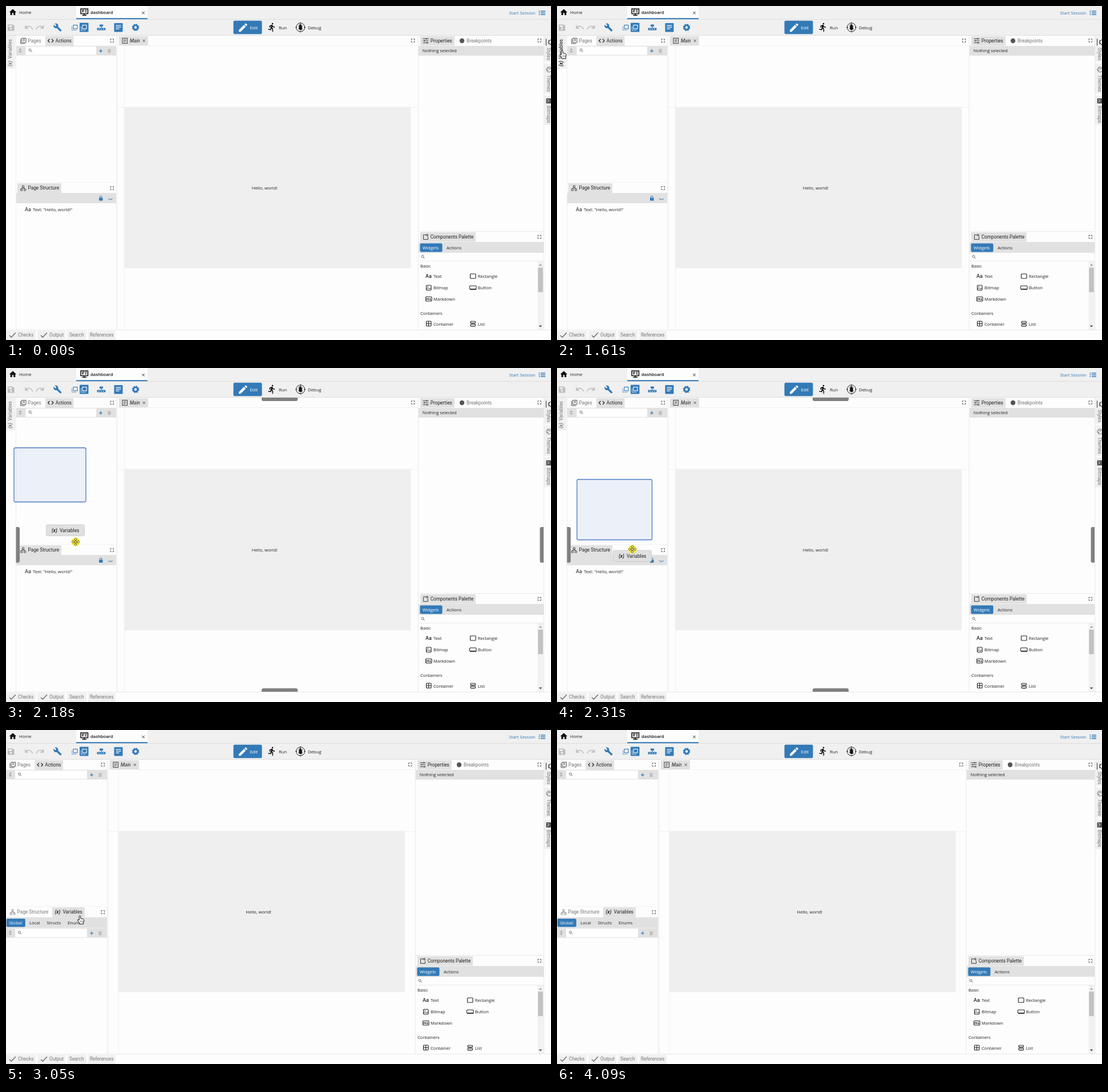
An HTML page that plays this animation: 955x586 px, repeating every 4570 ms.

```html
<!DOCTYPE html>
<html lang="en">
<head>
<meta charset="utf-8">
<title>Docking a panel</title>
<style>
html, body { margin: 0; width: 100%; height: 100%; overflow: hidden; background: #fdfdfd; }
svg { display: block; width: 955px; height: 586px; }
text { white-space: pre; }
.ui { font: 7.65px "Open Sans", "Noto Sans", sans-serif; }
.tab { font: 8.3px Roboto, Arial, sans-serif; }
</style>
</head>
<body>
<svg id="stage" viewBox="0 0 955 586"></svg>
<script>
const LOOP = 4570;
const BLUE = '#337ab7', BAR = '#e1e1e1', PALE = '#f0f0f0', DARK = '#222', GREY = '#777';

// Drawing helpers
const rect = (x, y, w, h, fill, extra = '') =>
  `<rect x="${x}" y="${y}" width="${w}" height="${h}" fill="${fill}" ${extra}/>`;
const line = (d, color, width = 1, extra = '') =>
  `<path d="${d}" fill="none" stroke="${color}" stroke-width="${width}" ${extra}/>`;
const shape = (d, fill, extra = '') => `<path d="${d}" fill="${fill}" ${extra}/>`;
const dot = (x, y, r, fill, extra = '') => `<circle cx="${x}" cy="${y}" r="${r}" fill="${fill}" ${extra}/>`;
const at = (x, y, body, more = '') => `<g transform="translate(${x} ${y}) ${more}">${body}</g>`;
const label = (kind, x, y, s, fill = DARK, extra = '') =>
  `<text class="${kind}" x="${x}" y="${y + 2.8}" fill="${fill}" ${extra}>${s}</text>`;
const ui = (...a) => label('ui', ...a);
const tab = (...a) => label('tab', ...a);

// Icons
const expand = (x, y) => at(x - 2.7, y - 2.7,
  line('M0 2V0H2M3.5 0H5.5V2M5.5 3.5V5.5H3.5M2 5.5H0V3.5', '#444', .9));
const search = (x, y) => dot(x - .5, y - .6, 2, 'none', 'stroke="#555" stroke-width=".8"') +
  line(`M${x + 1} ${y + 1}l2 2`, '#555', .9);
const plus = (x, y) => line(`M${x - 3} ${y}h6M${x} ${y - 3}v6`, BLUE, 1.2);
const trash = (x, y) => shape(`M${x - 2.5} ${y - 2}h5v5.5h-5zM${x - 3} ${y - 3.4}h6v1h-6z`, '#bdbdbd');
const sorter = (x, y) => shape(`M${x - 2.6} ${y - .7}l2.6 -3.6 2.6 3.6zM${x - 2.6} ${y + .7}l2.6 3.6 2.6 -3.6z`, '#aaa');
const check = (x, y) => line(`M${x} ${y + .5}l3.3 3.3 7.5 -8`, '#666', 1.3);
const pages = (x, y) => line(`M${x + 2.5} ${y - 4.5}h7.5v7.5h-7.5zM${x + .5} ${y - 3}v8h8M${x + 4.5} ${y - 2.5}h3.5M${x + 4.5} ${y - .5}h3.5`, '#555', 1);
const code = (x, y) => line(`M${x + 3.5} ${y - 3}l-3 3 3 3M${x + 7} ${y - 3}l3 3 -3 3`, DARK, 1.2);
const tree = (x, y, c) => line(`M${x + 3.5} ${y - 4.5}h3v3h-3zM${x + .5} ${y + 1.5}h3v3h-3zM${x + 6.5} ${y + 1.5}h3v3h-3zM${x + 5} ${y - 1.5}v1.5M${x + 2} ${y + 1.5}v-1.5h6v1.5`, c, .9);
const varIcon = (x, y, fill = DARK) => tab(x, y, '(x)', fill, 'style="font-weight:700;font-style:italic"');
const aa = (x, y, fill = DARK) => tab(x, y, 'Aa', fill, 'style="font-size:9px;font-weight:500"');

const searchBar = (x, y, left, right) =>
  rect(left, y - 8.5, right - left, 17, BAR) + sorter(left + 7.5, y) +
  rect(x, y - 7.2, right - 35 - x, 14.7, '#fff') + search(x + 8, y - .5) +
  plus(right - 27, y + .5) + trash(right - 12, y + .5);

function header() {
  const undo = line('M0 -3v5h5M.5 1.5C3 -2.5 10 -3 12.5 4', '#bbb', 1.5);
  const wrench = 'M22.7 19l-9.1-9.1c.9-2.3.4-5-1.5-6.9-2-2-5-2.4-7.4-1.3L9 6 6 9 1.6 4.7C.4 7.1.9 10.1 2.9 12.1c1.9 1.9 4.6 2.4 6.9 1.5l9.1 9.1c.4.4 1 .4 1.4 0l2.3-2.3c.5-.4.5-1.1.1-1.4z';
  const pencil = 'M3 17.25V21h3.75L17.81 9.94l-3.75-3.75zM20.71 7.04a1 1 0 0 0 0-1.41l-2.34-2.34a1 1 0 0 0-1.41 0l-1.83 1.83 3.75 3.75z';
  const runner = 'M13.49 5.48c1.1 0 2-.9 2-2s-.9-2-2-2-2 .9-2 2 .9 2 2 2zm-3.6 13.9l1-4.4 2.1 2v6h2v-7.5l-2.1-2 .6-3c1.3 1.5 3.3 2.5 5.5 2.5v-2c-1.9 0-3.5-1-4.3-2.4l-1-1.6c-.4-.6-1-1-1.7-1-.3 0-.5.1-.8.1l-5.2 2.2v4.7h2v-3.4l1.8-.7-1.6 8.1-4.9-1-.4 2 7 1.4z';
  const dashed = (x, y, c) => rect(x, y, 7, 6.5, 'none', `stroke="${c}" stroke-width="1.1"`) +
    line(`M${x - 2.5} ${y + 2.5}v6.5h7.5`, c, 1.1, 'stroke-dasharray="1.5 1"');
  return rect(0, 0, 955, 51, PALE) + rect(123, 0, 125, 23, '#fdfdfd') +
    line('M0 23.5H955M0 51.5H955', '#dcdcdc') + rect(123, 21.2, 125, 2, BLUE) +
    at(4.5, 3.5, shape('M10 20v-6h4v6h5v-8h3L12 3 2 12h3v8z', '#111'), 'scale(.62)') + ui(23, 11, 'Home') +
    rect(131, 5, 12.5, 8.5, 'none', 'stroke="#111" stroke-width="1.5"') +
    line('M133 7.5h4M133 10h3M138.5 7.5h3M138 10.3h3.5', '#111', 1.3) +
    line('M137.2 13.5v2.5M133.5 16.2h7.5', '#111', 1.5) +
    ui(148, 11, 'dashboard', '#111', 'style="font-weight:600"') +
    line('M238.3 9.8l4.6 4.6m0 -4.6l-4.6 4.6', '#333', 1) +
    ui(881.5, 12, 'Start Session', BLUE) +
    line('M937 9h8M937 12h8M937 15h8', BLUE, 1.3) + line('M933.5 9h2M933.5 12h2M933.5 15h2', BLUE, 1.3) +
    shape('M3 32.5h9l2.5 2.5v8.5h-11.5z', '#bcbcbc') + rect(4.5, 34, 6, 2.8, PALE) + dot(8.7, 40, 1.8, PALE) +
    at(34, 37, undo) + at(65.5, 37, undo, 'scale(-1 1)') +
    at(82.5, 29.8, shape(wrench, BLUE), 'scale(.65)') +
    dashed(118, 33.5, BLUE) + rect(129, 29.5, 15.5, 16, BLUE, 'rx="1"') + dashed(134, 33.5, '#fff') +
    rect(164, 32.5, 6, 3.5, BLUE) + rect(166.5, 35, 1.2, 4, BLUE) + rect(159.5, 38.5, 15, 4, BLUE, 'rx="1"') +
    line('M162 40.5h2M166 40.5h2M170 40.5h2', PALE, 1) +
    rect(189.5, 30, 15, 15.5, BLUE, 'rx="1"') + line('M192.5 34.2h9M192.5 37.2h9M192.5 40.2h6', '#fff', 1.3) +
    dot(227, 37.6, 3.8, 'none', `stroke="${BLUE}" stroke-width="3"`) +
    dot(227, 37.6, 5.4, 'none', `stroke="${BLUE}" stroke-width="1.8" stroke-dasharray="2.4 1.84"`) +
    rect(398.5, 25.8, 50, 23.4, BLUE, 'rx="2.5"') +
    at(405.5, 28, shape(pencil, '#fff'), 'scale(.82)') + ui(427.5, 38, 'Edit', '#fff') +
    at(457.3, 28.6, shape(runner, '#111'), 'scale(.72)') + ui(478, 38, 'Run') +
    dot(516, 37.5, 7.6, 'none', 'stroke="#222" stroke-width="1"') +
    line('M516 28.5v3M516 43.5v3M507 37.5h3M522 37.5h3M512 34.5l8 6M520 34.5l-8 6M513.5 32.5l5 10', '#222', .9) +
    `<ellipse cx="516" cy="38.3" rx="2.8" ry="4" fill="#111"/>` + dot(516, 34, 1.9, '#111') + ui(529, 38, 'Debug');
}

function borders() {
  const side = (y, h, textY, s) => rect(943, y, 12, h, PALE) +
    at(948.2, textY, `<text class="tab" fill="${GREY}">${s}</text>`, 'rotate(90)');
  const foot = (x, w, textX, s) => rect(x, 570, w, 16, PALE) + tab(textX, 577.5, s, GREY);
  return line('M942.5 52V568M0 568.5H955', '#e8e8e8') +
    side(53, 45, 73, 'Styles') + side(101, 53, 121, 'Themes') + side(157, 52, 175, 'Bitmaps') +
    line('M946.5 57.5v12M950.5 63l4 -4M950 63.5l5 5M951 60v7', '#555', 1.3) +
    dot(951.5, 111.5, 4.5, 'none', 'stroke="#666" stroke-width="1"') + dot(950, 109.5, 1, '#666') + dot(953, 110, 1, '#666') + dot(949.5, 113, 1, '#666') +
    rect(946.5, 162, 9, 9, '#555', 'rx="1"') + line('M948.5 164.5h2M949 169l3 -4', '#eee', 1) +
    foot(0, 52, 21, 'Checks') + foot(55, 49, 76, 'Output') + foot(107, 34, 111, 'Search') + foot(144, 48, 147, 'References') +
    check(6, 577.5) + check(61, 577.5);
}

function leftPanels(docked) {
  const x = docked ? 0 : 18.5, right = docked ? 177 : 193, left = docked ? 0 : 17.5;
  let s = rect(x + 50.5, 53, 49.5, 17, BAR) + pages(x + 6.5, 61) + tab(x + 20, 61, 'Pages', GREY) +
    code(x + 54.5, 61) + tab(x + 68.3, 61, 'Actions') + expand(right - 7.3, 60.8) +
    searchBar(x + 16, 78.3, left, right) + line(`M${right + .5} 52V568M${right + 2} 52V568`, '#efefef') +
    line(`M${left} 309.5H${right}`, '#f2f2f2') + expand(right - 7.3, 319.5);
  if (docked) {
    s += rect(81, 311, 57, 17.5, BAR) + tree(6.5, 319.5, '#888') + tab(19.5, 319.5, 'Page Structure', GREY) +
      varIcon(85.5, 319.5) + tab(99.5, 319.5, 'Variables') +
      rect(0, 328.5, 177, 18.5, BAR) + rect(.8, 331, 33, 14.5, BLUE, 'rx="2"') + ui(5.3, 338.3, 'Global', '#fff') +
      ui(41, 338.3, 'Local') + ui(71.5, 338.3, 'Structs') + ui(108, 338.3, 'Enums') + searchBar(16, 356, 0, 177);
  } else {
    s += rect(20, 311, 77, 17, BAR) + tree(25, 319.5, '#444') + tab(38.5, 319.5, 'Page Structure') +
      rect(17.5, 328, 175.5, 18, BAR) + rect(163, 336.5, 6.5, 5, BLUE, 'rx=".6"') +
      line('M164.4 337v-1.6a1.85 1.85 0 0 1 3.7 0V337', BLUE, 1.1) +
      line('M179 337.5q4 3.5 8 0M181 339l-.7 1.2M183 339.5v1.3M185 339l.7 1.2', BLUE, .8) +
      aa(33, 356.7, '#444') + ui(47, 357, 'Text: "Hello, world!"') +
      line('M17.5 52V568', '#efefef') + rect(0, 52, 16.5, 58, PALE) +
      `<g id="sideTab" fill="${GREY}">` +
      at(10.2, 92.5, `<text class="tab">Variables</text>`, 'rotate(-90)') +
      at(10.2, 106, `<text class="tab" style="font-weight:700;font-style:italic">(x)</text>`, 'rotate(-90)') + '</g>';
  }
  return s;
}

function centerPanel(docked) {
  const x = docked ? 179 : 195, page = docked ? 196.7 : 207.2, right = docked ? 717 : 722;
  return rect(x + 3, 53, 51, 16, BAR) +
    rect(x + 9, 56.5, 8.5, 9, 'none', 'stroke="#444"') + line(`M${x + 11} 59h4.5M${x + 11} 61h4.5M${x + 11} 63h3`, '#444', .8) +
    tab(x + 22, 61, 'Main', DARK, 'style="font-style:italic"') +
    line(`M${x + 44.5} 58.8l4.4 4.4m0 -4.4l-4.4 4.4`, '#444', .9) + expand(right - 8.8, 60.5) +
    line(`M${x} 69.5H${right}M${page + .3} 70V568M${x} 177.7H${right}`, '#f0f0f0') +
    rect(page, 178, 502, 282, '#efefef') + ui(page + 223.6, 319, 'Hello, world!') +
    line(`M${right + .3} 52V568`, '#e9e9e9');
}

function rightPanels(docked) {
  const dx = docked ? -5 : 0, left = 723 + dx, width = 942 - left;
  const box = (x, y, w, h) => rect(x, y, w, h, 'none', 'rx="1" stroke="#222" stroke-width="1.1"');
  const fixed = rect(left, 70, width, 17, BAR) + expand(934.7, 60.5) + expand(934.7, 405) +
    rect(left, 414, width, 19, BAR) + line(`M${left} 395.5H942M${left} 447.5H942`, '#eaeaea') +
    rect(931.5, 448, 10, 120, '#f1f1f1') + rect(932.3, 459, 8.5, 43, '#c1c1c1') +
    shape('M933.8 455.5l2.7 -3 2.7 3z', '#999') + shape('M933.8 560.5l2.7 3 2.7 -3z', '#444');
  const moving = rect(726, 53, 60, 16.5, BAR) +
    line('M730.5 57.5h10M730.5 61h10M730.5 64.5h10M737 56v3M733.5 59.5v3M738 63v3', '#444', 1) +
    tab(743.7, 61, 'Properties') + dot(799, 61, 4.2, '#555') + tab(807, 61, 'Breakpoints', GREY) +
    ui(729.8, 78.5, 'Nothing selected') +
    rect(726, 397, 97, 16.5, BAR) + line('M737 401.5h-5.5v8h8v-5M738 399.5v5M735.5 402h5', '#444', 1) +
    tab(743.7, 405.3, 'Components Palette') +
    rect(725.5, 416.5, 39, 15, BLUE, 'rx="2"') + ui(730, 424, 'Widgets', '#fff') + ui(772, 424, 'Actions') +
    search(730.5, 440) + ui(726, 456, 'Basic') + ui(726, 539.5, 'Containers') +
    aa(735, 474) + ui(749, 474.3, 'Text') + box(813.5, 470, 9.5, 8) + ui(826.7, 474.3, 'Rectangle') +
    box(736.5, 490, 8.5, 8.5) + line('M737 496.5l2.2 -2 2 2 2 -1.5 1.5 1.5', DARK, 1) + dot(739.2, 492.6, .8, DARK) + ui(749, 494.3, 'Bitmap') +
    box(812.5, 491, 11.5, 5.5) + line('M813 497h11.2', DARK, 1.6) + ui(826.7, 494.3, 'Button') +
    box(735.5, 510.3, 10.5, 7.4) + line('M737.4 516v-3.4l1.6 1.8 1.6 -1.8v3.4M743.4 512.4v3M742 514.6l1.4 1.5 1.4 -1.5', DARK, 1) + ui(749, 514.3, 'Markdown') +
    box(736.5, 553, 8.5, 8.5) + line('M740.7 553v8.5M736.5 557.2h8.5', DARK, 1.1) + ui(749, 558.3, 'Container') +
    box(814, 553.2, 8.5, 3.2) + box(814, 558.4, 8.5, 3.2) + ui(826.7, 558.3, 'List');
  return fixed + at(dx, 0, moving);
}

const layout = docked => leftPanels(docked) + centerPanel(docked) + rightPanels(docked);

const handles = shape('M448 52h63v3q0 3 -3 3h-57q-3 0 -3 -3zM448 568v-3q0 -3 3 -3h57q3 0 3 3v3z' +
  'M17.5 279h3.5q3 0 3 3v56.500q0 3 -3 3h-3.5zM942 279h-3.500q-3 0 -3 3v56.500q0 3 3 3h3.500z', '#808080');
const cursors = {
  arrow: shape('M.5 .5V15.500L4 12.300 6.500 18 8.700 17 6.300 11.500H11.200Z', '#fff', 'stroke="#111" stroke-width=".9"'),
  hand: shape('M-1.300 1Q0 -.8 1.300 1V5L5.800 6Q7.300 6.500 7.100 8.500L6.300 12V14.800H-1V13L-3.800 8.700Q-4.200 6.700 -2.600 7L-1.300 8.300Z', '#fff', 'stroke="#111" stroke-width="1"') +
    line('M3 9v3M1 9v3M5 9v3', '#111', .6),
  move: dot(0, 0, 7.5, '#fdf03c') +
    [0, 90, 180, 270].map(a => shape('M0 -7l2.500 2.700h-1.500v2.300h-2v-2.300h-1.500z', '#fffbc0',
      `stroke="#554d00" stroke-width=".8" transform="rotate(${a})"`)).join('') +
    rect(-1.3, -1.3, 2.6, 2.6, '#fffbc0', 'stroke="#554d00" stroke-width=".7"')
};

const stage = document.getElementById('stage');
stage.innerHTML = rect(0, 0, 955, 586, '#fdfdfd') + header() + borders() +
  `<g id="before">${layout(false)}</g><g id="after">${layout(true)}</g>` +
  `<g id="drag">${handles}` +
  `<rect id="outline" rx="2.5" fill="#3f6fd0" fill-opacity=".09" stroke="#4c7cc4" stroke-width="1.3"/>` +
  `<g id="chip">${rect(-33.5, 2, 67, 19.5, '#e0e0e0', 'rx="2.5" stroke="#c8c8c8" stroke-width=".8"')}` +
  `${varIcon(-24, 11.8)}${tab(-10, 11.8, 'Variables')}</g></g>` +
  Object.entries(cursors).map(([name, body]) => `<g id="${name}">${body}</g>`).join('');

const el = id => document.getElementById(id);
const show = (id, on) => el(id).setAttribute('display', on ? 'inline' : 'none');
const move = (id, [x, y]) => el(id).setAttribute('transform', `translate(${x} ${y})`);
const mix = (a, b, p) => a.map((v, i) => v + (b[i] - v) * p);
const ease = p => p * p * (3 - 2 * p);

const step = (t, from, to, count) =>
  Math.max(0, Math.min(count - 1, Math.floor((t - from) / (to - from) * (count - 1) + .1)));

// Linear interpolation through [step, values] keys.
function track(keys, k) {
  const i = Math.max(1, keys.findIndex(([at]) => at >= k));
  const [a, from] = keys[i - 1], [b, to] = keys[i];
  return mix(from, to, (k - a) / (b - a));
}
const dragPath = [[0, [10, 83]], [2, [55, 191]], [3, [86, 241]], [5, [122, 305]], [7, [132, 318]], [11, [132, 325]]];
const dropBox = [[0, [.5, 53, 17, 110]], [3, [3.5, 53.5, 34.5, 109.5]], [5, [14, 140, 140, 235]],
  [7, [35, 195.5, 166.5, 301.500]], [9, [80, 277, 118, 322]], [11, [97, 311, 100, 329]]];

const dragStep = t => t < 2380 ? step(t, 1810, 2310, 8) : 8 + step(t, 2380, 2590, 4);

function cursorAt(t) {
  if (t < 590) return null;
  if (t < 1000) return ['arrow', mix([864, 548], [3, 118], ease(step(t, 590, 1000, 7) / 5))];
  if (t < 1270) return null;
  if (t < 1470) return ['hand', [-4, 77.5]];
  if (t < 1810) return ['hand', mix([2, 77.5], [9, 77.5], step(t, 1470, 1610, 3) / 2)];
  if (t < 3050) return ['move', track(dragPath, dragStep(t))];
  if (t < 3320) return ['hand', [129.5, 325.5]];
  if (t < 3880) return ['arrow', mix([135, 331], [814, 580], ease((step(t, 3320, 3810, 8) + .5) / 7.5))];
  if (t < 4080) return ['arrow', mix([850, 581], [888, 581], step(t, 3880, 4090, 4) / 2)];
  return null;
}

function render(t) {
  const docked = t >= 3050, dragging = t >= 1810 && !docked;
  show('before', !docked);
  show('after', docked);
  show('drag', dragging);
  el('sideTab').setAttribute('fill', t >= 1470 && t < 1810 ? '#111' : GREY);
  if (dragging) {
    const k = dragStep(t), [x1, y1, x2, y2] = track(dropBox, k);
    const box = { x: x1, y: y1, width: x2 - x1, height: y2 - y1 };
    for (const name in box) el('outline').setAttribute(name, box[name]);
    move('chip', track(dragPath, k < 7 ? Math.max(0, k - 1) : k));
  }
  const cursor = cursorAt(t);
  for (const name in cursors) show(name, cursor && cursor[0] === name);
  if (cursor) move(cursor[0], cursor[1]);
}

const start = performance.now();
function tick() {
  render((performance.now() - start) % LOOP);
  requestAnimationFrame(tick);
}
tick();
</script>
</body>
</html>
```
